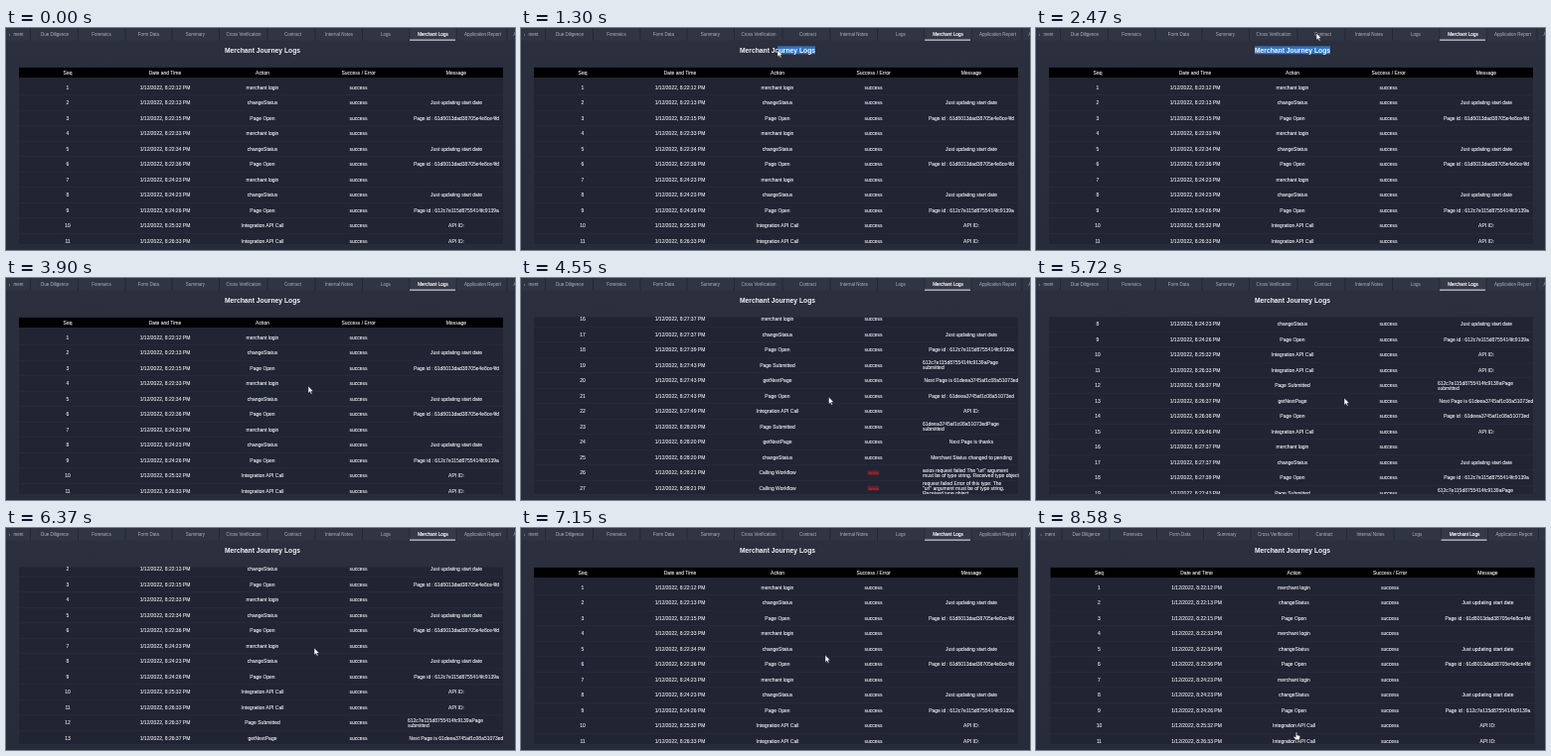
Recreate the animation shown at these times as an HTML page. Size 512 px wide and 224 px high, loop 8840 ms.

```html
<!DOCTYPE html>
<html lang="en">
<head>
<meta charset="utf-8">
<title>Merchant Journey Logs</title>
<style>
  html, body { margin: 0; width: 100%; height: 100%; overflow: hidden; background: #2a2e3d; }
  svg { display: block; width: 100%; height: 100%; }
  text { font-family: "Liberation Sans", Arial, sans-serif; font-size: 5px; fill: #f4f5f8; text-anchor: middle; }
  #table text { stroke: #f4f5f8; stroke-width: .08; }
  #tabs .tab { font-size: 4.5px; fill: #b2b6c2; }
  #tabs .active { font-size: 4.65px; fill: #fff; stroke: #fff; stroke-width: .15; }
  .title { font-size: 6.75px; font-weight: bold; fill: #f6f7f9; }
  #table .left { text-anchor: start; }
  #table .error { font-size: 4.4px; fill: #d5343a; stroke: none; }
</style>
</head>
<body>
<svg id="stage" viewBox="0 0 512 224">
  <defs>
    <linearGradient id="page" x2="0" y2="1">
      <stop offset="0" stop-color="#2b2f3e"/>
      <stop offset="1" stop-color="#282c3a"/>
    </linearGradient>
    <clipPath id="view"><rect x="13" y="39" width="490" height="179"/></clipPath>
  </defs>
  <rect width="512" height="224" fill="url(#page)"/>
  <rect id="mark" y="18.3" height="8" fill="#2f73c4"/>
  <text class="title" x="258" y="24.7">Merchant Journey Logs</text>
  <g id="content">
    <g id="tabs"></g>
    <rect x="13" y="39.5" width="487" height="178.5" fill="#212433"/>
    <g clip-path="url(#view)"><g id="table"></g></g>
  </g>
  <g id="cursor" fill="#fff" stroke="#1a1c26" stroke-width=".5" stroke-linejoin="round">
    <path id="arrow" d="M0 0V7.2L1.7 5.7L2.9 8.3L4 7.8L2.9 5.3H5.1Z"/>
    <path id="hand" d="M-.7 .5Q0 -.5 .7 .5V3L3.1 3.5Q3.9 3.8 3.7 4.8L3 7.8H-.9L-3 4.9Q-2.7 3.9 -1.8 4.4L-.7 5.2Z"/>
  </g>
</svg>
<script>
const LOOP = 8840, TICK = 130, PITCH = 15.5, FIRST = 60;
const LEFT = 13, WIDTH = 487;
const COLS = [62, 160, 258, 354.5, 453];
const $ = id => document.getElementById(id);

function add(parent, name, attrs, content) {
  const node = document.createElementNS("http://www.w3.org/2000/svg", name);
  for (const key in attrs) node.setAttribute(key, attrs[key]);
  if (content) node.textContent = content;
  return parent.appendChild(node);
}

function label(parent, x, y, content, style = "") {
  return add(parent, "text", { x, y: y + 1.8, class: style }, content);
}

function buildTabs() {
  const names = ["Due Diligence", "Forensics", "Form Data", "Summary", "Cross Verification",
    "Contract", "Internal Notes", "Logs", "Merchant Logs", "Application Report"];
  const centers = [49, 96, 143.5, 190.5, 239, 288.5, 335, 382, 429.5, 479.5];
  const edges = [24.5, 72.5, 120, 167, 214.5, 263, 311, 358.5, 406, 453, 504];
  const tabs = $("tabs");
  add(tabs, "rect", { x: -4, y: 0, width: 520, height: 12.5, fill: "#303443" });
  edges.forEach(x => add(tabs, "rect", { x: x - .4, y: 0, width: .8, height: 12.5, fill: "#222634" }));
  add(tabs, "rect", { x: 406.4, y: 0, width: 46.2, height: 12.5, fill: "#353948" });
  add(tabs, "rect", { x: 406, y: 11.6, width: 46, height: 1, fill: "#eceef2" });
  label(tabs, 3.5, 6, "‹", "tab");
  label(tabs, 12.5, 6, "ment", "tab");
  names.forEach((name, i) => label(tabs, centers[i], 6, name, name === "Merchant Logs" ? "active" : "tab"));
  label(tabs, 512, 6, "A", "tab");
}

// Each entry: time, action, message lines
function logRows() {
  const a = "61d8013dad38705e4e8ce4fd", b = "612c7e115d8755414fc9139a", c = "61deea3745af1c08a51073ed";
  const login = t => [t, "merchant login"];
  const status = (t, msg = "Just updating start date") => [t, "changeStatus", msg];
  const open = (t, id) => [t, "Page Open", "Page id : " + id];
  const call = t => [t, "Integration API Call", "API ID:"];
  const sent = (t, id) => [t, "Page Submitted", id + "Page", "submitted"];
  const next = (t, to) => [t, "getNextPage", "Next Page is " + to];
  const flow = (t, ...msg) => [t, "Calling Workflow", ...msg];
  return [
    login("22:12"), status("22:13"), open("22:15", a),
    login("22:33"), status("22:34"), open("22:36", a),
    login("24:23"), status("24:23"), open("24:26", b),
    call("25:32"), call("26:33"), sent("26:37", b), next("26:37", c), open("26:38", c), call("26:46"),
    login("27:37"), status("27:37"), open("27:39", b), sent("27:43", b), next("27:43", c), open("27:43", c),
    call("27:49"), sent("28:20", c), next("28:20", "thanks"),
    status("28:20", "Merchant Status changed to pending"),
    flow("28:21", 'axios request failed The "url" argument', "must be of type string. Received type object"),
    flow("28:21", "request failed Error of this type: The", '"url" argument must be of type string.', "Received type object")
  ];
}

function buildTable() {
  const table = $("table");
  add(table, "rect", { x: LEFT, y: 40, width: WIDTH, height: 10, fill: "#000" });
  ["Seq", "Date and Time", "Action", "Success / Error", "Message"]
    .forEach((name, i) => label(table, COLS[i], 44.7, name));
  logRows().forEach(([time, action, ...lines], i) => {
    const y = FIRST + i * PITCH;
    label(table, COLS[0], y, i + 1);
    label(table, COLS[1], y, `1/12/2022, 8:${time} PM`);
    label(table, COLS[2], y, action);
    if (action === "Calling Workflow") {
      add(table, "rect", { x: 348.5, y: y - 2.3, width: 12, height: 4.8, rx: 1, fill: "#64202a" });
      label(table, COLS[3], y - .2, "error", "error");
    } else {
      label(table, COLS[3], y, "success");
    }
    const wrapped = lines.length > 1;
    lines.forEach((line, k) => label(table, wrapped ? 404 : COLS[4],
      y + (k - (lines.length - 1) / 2) * 5.2, line, wrapped ? "left" : ""));
    add(table, "rect", { x: LEFT, y: y + 7.5, width: WIDTH, height: .5, fill: "#2b2f3f" });
  });
}

// Keys: [time, ...values]; linear between neighbours
function at(keys, t) {
  let i = 0;
  while (i < keys.length - 1 && keys[i + 1][0] <= t) i++;
  const p = keys[i], q = keys[i + 1] || p;
  const k = q === p ? 0 : Math.max(0, (t - p[0]) / (q[0] - p[0]));
  return p.slice(1).map((v, j) => v + (q[j + 1] - v) * k);
}

const PATH = [[130, 420, 190], [390, 335, 62], [650, 335, 62], [1040, 296, 22], [1560, 220, 22],
  [1950, 220, 22], [2470, 282, 5], [2600, 282, 5], [3510, 296, 70], [3900, 304, 109],
  [4550, 309.5, 120], [5330, 309.5, 120], [5720, 310, 121], [7020, 310, 121],
  [7930, 282, 172], [8320, 262, 206]];
const SCROLL = [[3900, 0], [4030, 40], [4290, 165], [4550, 251], [5330, 251], [5720, 122],
  [5850, 104], [5980, 104], [6370, 34], [6630, 0]];
const SELECT = [[1040, 296], [1560, 220]];

function draw(ms) {
  const t = Math.floor((ms % LOOP) / TICK) * TICK;
  const [x, y] = at(PATH, t);
  const [scroll] = at(SCROLL, t);
  const [from] = at(SELECT, t);
  const late = t >= 8060; // the page sits slightly right and the pointer is a hand
  $("content").setAttribute("transform", `translate(${late ? 1.5 : 0} 0)`);
  $("table").setAttribute("transform", `translate(0 ${-scroll})`);
  $("mark").setAttribute("x", from);
  $("mark").setAttribute("width", t < 2860 ? 296 - from : 0);
  $("cursor").setAttribute("transform", `translate(${x} ${y})`);
  $("cursor").setAttribute("visibility", t < 130 ? "hidden" : "visible");
  $("arrow").setAttribute("display", late ? "none" : "inline");
  $("hand").setAttribute("display", late ? "inline" : "none");
}

buildTabs();
buildTable();
const start = performance.now();
function frame() {
  draw(performance.now() - start);
  requestAnimationFrame(frame);
}
frame();
</script>
</body>
</html>
```
